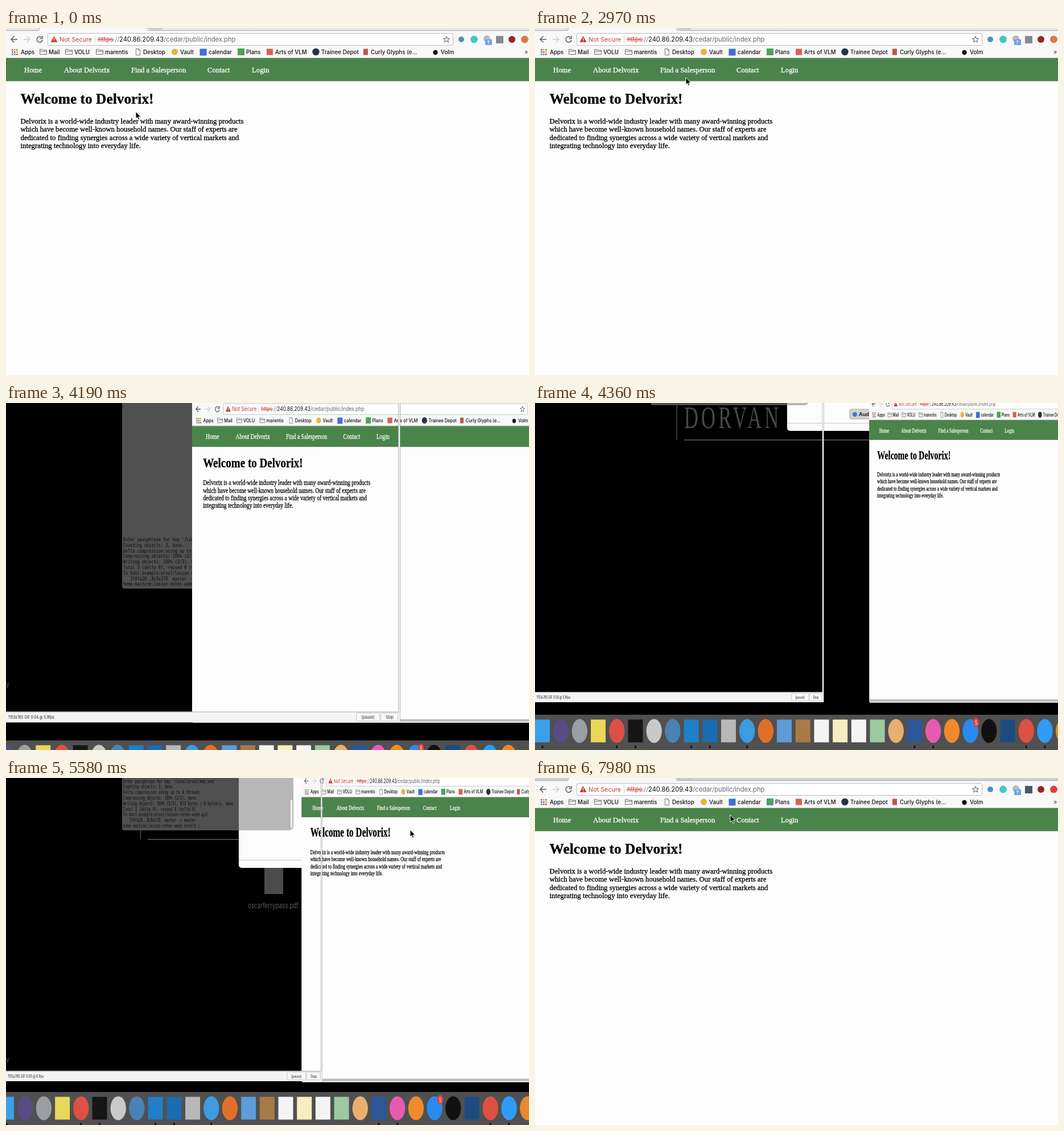
Write an HTML page with a canvas that moves like this. It is 919 px wide and 610 px high and loops after 8 s.

```html
<!DOCTYPE html>
<html lang="en">
<head>
<meta charset="utf-8">
<title>Desktop recording</title>
<style>
html, body { margin: 0; width: 919px; height: 610px; overflow: hidden; background: #000; }
canvas { display: block; }
</style>
</head>
<body>
<canvas id="stage" width="919" height="610"></canvas>
<script>
const ctx = document.getElementById('stage').getContext('2d');
const SANS = 'Inter, sans-serif', SERIF = '"Liberation Serif", serif', MONO = '"DejaVu Sans Mono", monospace';

// time, zoom, pointer x, pointer y, pointer kind (a = arrow, h = hand)
const STEPS = [
  [0, 0, 228, 147, 'a'], [150, 0, 234, 145, 'a'], [300, 0, 240, 144, 'a'],
  [590, 0, 243, 136, 'a'], [740, 0, 250, 122, 'a'], [890, 0, 258, 104, 'a'],
  [1040, 0, 265, 88, 'a'], [1180, 0, 269, 77, 'h'], [1330, 0, 270, 75, 'h'],
  [2220, 0, 271, 74, 'h'], [2970, 0, 265, 87, 'a'],
  [3270, .015, 269, 84, 'a'], [3620, .035, 274, 80, 'a'], [3770, .047, 278, 78, 'a'],
  [4190, .25], [4360, .449], [4540, .489], [4990, .489, 760, 100, 'a'],
  [5580, .397, 710, 91, 'a'], [5730, .27, 600, 92, 'a'], [5880, .13, 450, 93, 'a'],
  [6030, .05, 330, 93, 'a'], [6180, .012, 270, 92, 'a'], [6340, 0, 244, 92, 'a'],
  [6490, 0, 243, 74, 'h'], [6790, 0, 243, 72, 'h'], [7090, 0, 243, 71, 'h'],
  [7690, 0, 275, 68, 'a'], [7840, 0, 320, 66, 'a'], [7980, 0, 343, 65, 'a']
];

// Layout of the desktop for a few zoom values
const KEYS = ['zoom', 'sy', 'pageY', 'recB', 'dockY', 'winX', 'winB', 'audioX', 'termR', 'termB', 'lineX', 'lineY'];
const POSES = [
  [0, 1, 0, 630, 680, 360, 700, 375, 590, 700, 330, 400],
  [.047, .953, -.6, 601, 650, 365, 633, 380, 580, 650, 320, 380],
  [.397, .868, -12.2, 533, 552, 409, 158, 525, 505, 92, 236, 108],
  [.449, .861, -15.6, 526, 548, 443, 49, 557, 481, 4, 249, 65],
  [.489, .85, -17.5, 516, 545, 470, -30, 580, 460, -60, 259, 30]
];

const DOCK = ('s3aa0ea c594b86 c9b9ea2 se9d75a cdd5144 s151515 cc9c9c9 c4b82b4 s1f7fc8 s1a6bb0 sb8b8b8 c3d9be0 ' +
  'ce07028 s5e9bd8 sa87a48 sf4f4f4 sf7eec0 sf4f4f4 s9cc9a0 ce8b070 s2b579a ce85ab0 cf08a2a c2a8af0 c111111 ' +
  's1d4a80 cdd5144 c2f9bf5 ce58a30').split(' ');
const RUNNING = [0, 4, 5, 8, 9, 11, 20, 21, 26, 27];

const LOG = ["Enter passphrase for key '/Local/orvel/key_one'", 'Counting objects: 3, done.',
  'Delta compression using up to 4 threads.', 'Compressing objects: 100% (2/2), done.',
  'Writing objects: 100% (3/3), 874 bytes | 0 bytes/s, done.', 'Total 3 (delta 0), reused 0 (delta 0)',
  'To host.example:orvel/lesson-notes-week.git', '   3f0fa20..8c0a170  master -> master', 'home-machine:lesson-notes-week orvel$ \u25af'];

function rect(x, y, w, h, fill) { ctx.fillStyle = fill; ctx.fillRect(x, y, w, h); }
function disc(x, y, r, fill) { ctx.fillStyle = fill; ctx.beginPath(); ctx.arc(x, y, r, 0, 7); ctx.fill(); }
function box(x, y, w, h, r, fill, stroke) {
  ctx.beginPath(); ctx.roundRect(x, y, w, h, r);
  if (fill) { ctx.fillStyle = fill; ctx.fill(); }
  if (stroke) { ctx.strokeStyle = stroke; ctx.stroke(); }
}
function text(s, x, y, size, font, fill, weight = '') {
  ctx.font = `${weight} ${size}px ${font}`; ctx.fillStyle = fill; ctx.fillText(s, x, y);
}
// Serif page text with a slightly heavier stroke
function inkText(s, x, y, size, fill, weight) {
  text(s, x, y, size, SERIF, fill, weight);
  ctx.lineWidth = .3; ctx.strokeStyle = fill; ctx.strokeText(s, x, y); ctx.lineWidth = 1;
}
function path(d, fill, stroke, width = 1) {
  const p = new Path2D(d);
  if (fill) { ctx.fillStyle = fill; ctx.fill(p); }
  if (stroke) { ctx.lineWidth = width; ctx.strokeStyle = stroke; ctx.stroke(p); ctx.lineWidth = 1; }
}
function placed(x, y, sx, sy, draw) {
  ctx.save(); ctx.translate(x, y); ctx.scale(sx, sy); draw(); ctx.restore();
}

function poseAt(zoom) {
  let i = 1;
  while (i < POSES.length - 1 && zoom > POSES[i][0]) i++;
  const a = POSES[i - 1], b = POSES[i], k = (zoom - a[0]) / (b[0] - a[0]);
  return Object.fromEntries(KEYS.map((key, n) => [key, a[n] + (b[n] - a[n]) * k]));
}

function toolbar(late) {
  rect(0, -40, 1000, 45, late ? '#cdd0d3' : '#e6e6e6');
  path('M58 5L62 -8H244L250 5Z', '#f8f8f8');
  path('M0 4.5H57L62 -8M244 -8L250 4.5H1000', null, '#a9a9a9');
  box(252, -12, 22, 14, 3, '#dadada', '#aaa');
  rect(0, 5, 1000, 48, '#f8f8f8');
  rect(0, 52, 1000, 1, '#c4c4c4');
  path('M20 20H9.5M14.5 14.5L9 20L14.5 25.5', null, '#5a5a5a', 1.5);
  path('M31 20H41.5M36.5 14.5L42 20L36.5 25.5', null, '#d0d0d0', 1.5);
  path('M62.5 16.5A5 5 0 1 0 64 21M64 14V18.5H59.5', null, '#5a5a5a', 1.5);
  box(73.5, 9.5, 712, 21, 2, '#fff', '#b9b9b9');
  path('M84.5 14L90.5 25H78.5Z', '#c53929');
  rect(84, 17.5, 1.2, 4, '#fff'); rect(84, 22.5, 1.2, 1.2, '#fff');
  text('Not Secure', 94, 24, 10.8, SANS, '#c53929');
  rect(156, 13, 1, 14, '#d3d3d3');
  text('https', 162, 24, 11, SANS, '#c53929');
  rect(161, 20, 28, 1, '#c53929');
  text('://', 188, 24, 11, SANS, '#777');
  const host = '240.86.209.43';
  text(host, 199, 24, 11.2, SANS, '#111');
  text('/cedar/public/index.php', 199 + ctx.measureText(host).width, 24, 11.2, SANS, '#666');
  path('M774 14.5L775.5 18.3L779.5 18.5L776.4 21L777.5 25L774 22.8L770.5 25L771.6 21L768.5 18.5L772.5 18.3Z', null, '#555');
  disc(800, 20, 5, '#4c91c4');
  disc(822.5, 20, 6.5, '#45c8bc');
  disc(845, 19, 6, '#b9b9b9');
  box(842, 20, 12, 10, 1, '#6ea3e8');
  text('?', 845.5, 28, 8, SANS, '#fff', 'bold');
  rect(861, 14, 13, 13, late ? '#4a5568' : '#858b96');
  disc(889, 20, 6, '#94242c');
  disc(911.5, 20, 6.5, late ? '#dc4630' : '#d97a45');
}

function bookmarks() {
  ['#d9503f', '#e2a33b', '#4aa564', '#4d83d8'].forEach((c, i) => {
    for (let n = i; n < 9; n += 4) rect(10 + n % 3 * 4, 37 + Math.floor(n / 3) * 4, 2.7, 2.7, c);
  });
  for (const x of [59, 104, 158]) path(`M${x + .5} 46.5V37.5H${x + 5}L${x + 6.5} 39H${x + 12.5}V46.5ZM${x + .5} 40.8H${x + 12.5}`, '#eee', '#777');
  path('M228.5 36.5H233L235.5 39V47.5H228.5ZM233 36.5V39H235.5', '#fff', '#777');
  disc(296.5, 42, 5.5, '#e3b53c');
  rect(340.5, 36.5, 12, 12, '#3f70cf');
  rect(407, 36, 12, 12, '#4aa260');
  rect(458, 36.5, 11, 11, '#d26450');
  disc(544.5, 42, 6.2, '#273242');
  rect(628, 36.5, 8, 11, '#b65a4c');
  disc(754.5, 43, 4.2, '#111');
  const labels = [['Apps', 26], ['Mail', 75], ['VOLU', 120], ['marentis', 174], ['Desktop', 241], ['Vault', 306],
    ['calendar', 356], ['Plans', 422], ['Arts of VLM', 473], ['Trainee Depot', 554], ['Curly Glyphs (e\u2026', 641], ['Volm', 764]];
  for (const [label, x] of labels) text(label, x, 45.5, 9.8, SANS, '#111', '500');
  text('\u00bb', 911, 45.5, 11, SANS, '#444');
}

function page(late) {
  box(0, -40, 1000, 670, 4, '#fdfdfd');
  rect(0, 623, 1000, 5, '#bdbdbd');
  toolbar(late);
  bookmarks();
  rect(0, 53, 1000, 40.5, '#4a844a');
  const links = [['Home', 32], ['About Delvorix', 102], ['Find a Salesperson', 220], ['Contact', 354], ['Login', 432]];
  for (const [label, x] of links) inkText(label, x, 78, 12.75, '#fff');
  inkText('Welcome to Delvorix!', 25.5, 133, 25.4, '#000', 'bold');
  ['Delvorix is a world-wide industry leader with many award-winning products',
    'which have become well-known household names. Our staff of experts are',
    'dedicated to finding synergies across a wide variety of vertical markets and',
    'integrating technology into everyday life.'
  ].forEach((line, i) => inkText(line, 25.5, 168 + i * 14.4, 12.75, '#000'));
}

function desktop(o, squeeze) {
  rect(o.lineX - .5, 0, 1.5, o.lineY, '#484848');
  rect(o.lineX + 13, o.lineY - 1, 330, 2, '#484848');
  placed(o.lineX + 13, o.lineY - 21, squeeze, 1, () => {
    ctx.letterSpacing = '8px';
    text('DORVAN', 0, 0, 54, SERIF, '#484848');
    ctx.letterSpacing = '0px';
  });
  if (o.zoom < .2) {
    [[20, -31], [25, 60], [30, 149]].forEach(([w, y]) => box(-12, y, w + 12, 33, 2, '#62b5dc'));
    [['ntis', 0, 24], ['Projects', 1, 116], ['tBench', 0, 204]].forEach(([s, x, y]) => text(s, x, y, 9.8, SANS, '#fff', '600'));
  } else if (o.zoom < .42) {
    rect(454, o.lineY + 50, 33, 46, '#4b4b4b');
    placed(425, o.lineY + 121, squeeze, 1, () => text('oscarferrypass.pdf', 0, 0, 14.2, SANS, '#565656'));
    text('y', 0, 499, 11, SANS, '#565656');
  }
  rect(204, o.termB - 500, o.termR - 204, 500, '#000');
  box(o.winX, o.winB - 400, 400, 400, 5, '#fcfcfc');
  rect(o.winX, o.winB - 14, 400, 1, '#c4c4c4');
  box(o.audioX - 4, o.winB - 38, 60, 17, 2, '#d2d2d2', '#aaa');
  disc(o.audioX + 5, o.winB - 29, 4, '#3f79c4');
  text('Audio', o.audioX + 12, o.winB - 26, 9, SANS, '#222', 'bold');
  const termX = o.zoom < .1 ? 180 : 204;
  box(termX, o.termB - 500, o.termR - termX, 500, [0, 0, 8, 4], 'rgba(136,136,136,.59)');
  box(o.termR - 6, o.termB - 55, 5, 52, 2.5, '#eee', '#999');
  LOG.forEach((line, i) => placed(206, o.termB - 5 - (LOG.length - 1 - i) * 9.8, squeeze, 1,
    () => text(line, 0, 0, 8.25, MONO, '#0c0c0c')));
}

function recorder(o, t) {
  const clock = t < 4190 ? '0:03 @ 6.3fps' : t < 5290 ? '0:04 @ 5.9fps' : '0:05 @ 6.1fps';
  placed(0, o.recB, (925 - 931 * o.zoom) / 882, o.sy / .953, () => {
    rect(878.5, -700, 4, 700, '#f6f6f6');
    rect(878, -700, .8, 700, '#888');
    rect(882, -700, .8, 700, '#888');
    rect(0, -20, 882, 20, '#f4f4f4');
    rect(0, -20, 880, 1, '#a9a4ac');
    box(784.5, -17.5, 52, 15, 1, '#f8f8f8', '#bbb');
    box(839.5, -17.5, 38, 15, 1, '#f8f8f8', '#bbb');
    text('1153x765 GIF ' + clock, 5, -7, 7.8, SANS, '#222');
    text('[pause]', 796, -6.5, 8, SANS, '#222');
    text('Stop', 850, -6.5, 8, SANS, '#222');
  });
}

function dock(o) {
  rect(0, o.dockY, 919, 70, '#505050');
  DOCK.forEach((icon, i) => placed(13 + (o.zoom - .449) * 230 + i * 32.7, o.dockY + 28.5, .65, 1, () => {
    const fill = '#' + icon.slice(1);
    if (icon[0] === 'c') disc(0, 0, 21, fill); else rect(-20, -20, 40, 40, fill);
    if (i === 23) { disc(15, -15, 8, '#e8413c'); text('5', 12, -11, 11, SANS, '#fff'); }
    if (RUNNING.includes(i)) disc(0, 28, 2.5, '#111');
  }));
}

function pointer(x, y, kind) {
  placed(x, y, 1, 1, () => {
    if (kind === 'a') path('M0 0V12.5L2.9 9.9L4.9 14.5L7 13.6L5 9.2H9Z', '#000', '#fff');
    else path('M4 8V2Q5 0 6 2V6Q7.5 5 8.5 6.5Q10 5.5 11 7Q12.5 7 12.5 8.5V11L11 15H5L1 9.5Q1.5 7.5 4 9Z', '#fff', '#111');
  });
}

function draw(t) {
  const [, zoom, x, y, kind] = STEPS.findLast(step => step[0] <= t);
  const o = poseAt(zoom), sx = 1 - zoom;
  rect(0, 0, 919, 610, '#000');
  if (zoom) desktop(o, sx / o.sy);
  placed(1308 * zoom, o.pageY, sx, o.sy, () => page(t >= 5730));
  if (zoom) { recorder(o, t); dock(o); }
  if (kind) pointer(x, y, kind);
}

function tick() {
  draw(performance.now() % 8000);
  requestAnimationFrame(tick);
}
tick();
</script>
</body>
</html>
```
